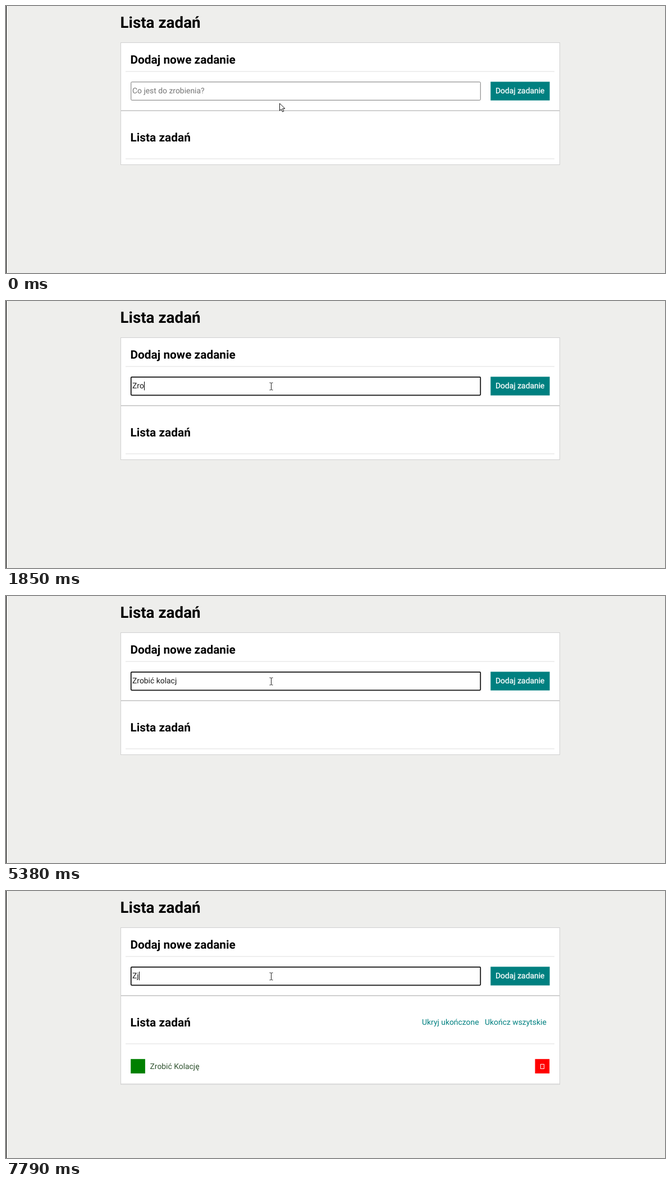
Recreate the animation shown at these times as an HTML page. Size 1174x477 px, loop 8000 ms.

```html
<!DOCTYPE html>
<html lang="pl">
<head>
<meta charset="utf-8">
<title>Lista zadań</title>
<style>
  html, body { margin: 0; width: 100%; height: 100%; overflow: hidden; background: #eeeeec; }
  svg { display: block; width: 1174px; height: 477px; }
  text { font: 13.9px Roboto, Arial, sans-serif; text-rendering: geometricPrecision; white-space: pre; }
  .h1 { font-size: 27.8px; font-weight: 700; }
  .h2 { font-size: 20.85px; font-weight: 700; }
  .hint { fill: #757575; }
  .link, .add { fill: #008080; }
  .label { fill: #fff; stroke: #fff; stroke-width: .3; }
  .card { fill: #fff; stroke: #d0d0d0; }
  .rule { fill: #eee; }
  #typed { fill: #1a1a1a; }
  #field { fill: #fff; stroke: #767676; }
  #field.focus { stroke: #101010; stroke-width: 1.75; }
</style>
</head>
<body>
<svg viewBox="0 0 1174 477">
  <rect width="1174" height="477" fill="#eeeeec"/>
  <rect width="1" height="477"/>
  <text class="h1" x="203.5" y="39">Lista zadań</text>

  <rect class="card" x="204.5" y="65.5" width="782" height="121"/>
  <text class="h2" x="221.5" y="102.5">Dodaj nowe zadanie</text>
  <rect class="rule" x="213" y="116" width="764" height="2"/>
  <rect id="field" x="222.75" y="135.75" width="622.5" height="32.5" rx="1.5"/>
  <text id="hint" class="hint" x="225" y="156">Co jest do zrobienia?</text>
  <text id="typed" x="225" y="156"></text>
  <rect id="caret" y="144" width="1" height="15.5"/>
  <rect class="add" x="863.3" y="135.3" width="105.3" height="33.4"/>
  <text class="label" x="872" y="156">Dodaj zadanie</text>

  <rect id="list" class="card" x="204.5" y="187.5" width="782" height="96"/>
  <text class="h2" x="221.5" y="242">Lista zadań</text>
  <rect class="rule" x="213" y="272" width="764" height="2"/>

  <g id="task">
    <text class="link" x="741" y="239">Ukryj ukończone</text>
    <text class="link" x="853" y="239">Ukończ wszytskie</text>
    <rect x="222.2" y="300.2" width="25.7" height="25.7" fill="#008000"/>
    <text x="256.5" y="318" fill="#2f522f">Zrobić Kolację</text>
    <rect x="942.5" y="300.2" width="25.7" height="25.7" fill="#f00"/>
    <rect x="952.5" y="309.5" width="6" height="8" fill="none" stroke="#fff"/>
    <rect class="rule" x="205" y="343" width="781" height="2"/>
  </g>

  <path id="arrow" d="M.5.5V13.5L3.5 10.7 5.6 15.5 7.8 14.5 5.7 9.8H10Z" fill="#fff" stroke="#111"/>
  <path id="beam" d="M-3 -6.5H-1L0 -5.5 1 -6.5H3M0 -5.5V5.5M-3 6.5H-1L0 5.5 1 6.5H3" fill="none" stroke="#222"/>
</svg>
<script>
const LOOP = 8000, FOCUS = 340, ADDED = 6250, BLINK = 490, TICK = 61;
const FIRST = 'Zrobić kolację', SECOND = 'Zj';

// one key press per character of FIRST + SECOND, in ms
const keys = [980, 1720, 1850, 2230, 2510, 3370, 3520, 3750, 4000, 4180, 4380, 4660, 4870, 5950, 7360, 7790];

const el = id => document.getElementById(id);
const show = (id, on) => el(id).setAttribute('visibility', on ? 'visible' : 'hidden');

function drawField(t) {
  const pressed = keys.filter(k => k <= t);
  const count = pressed.length;
  const text = t < ADDED ? FIRST.slice(0, count) : SECOND.slice(0, count - FIRST.length);
  const typed = el('typed');
  if (typed.textContent !== text) typed.textContent = text;
  show('hint', !text);
  el('field').classList.toggle('focus', t >= FOCUS);

  // the blink restarts with every key
  const idle = t - Math.max(FOCUS, ...pressed);
  const width = text ? typed.getComputedTextLength() : 0;
  el('caret').setAttribute('x', Math.round(225 + width));
  show('caret', idle >= 0 && Math.floor(idle / BLINK) % 2 === 0);
}

function drawList(t) {
  const added = t >= ADDED;
  show('task', added);
  el('list').setAttribute('height', added ? 158 : 96);
}

// eases out to the field in four sampled steps
function drawPointer(t) {
  const step = Math.floor((t + 21) / TICK);
  const p = 1 - (1 - Math.min(step / 4, 1)) ** 2;
  const x = 487 - 14.5 * p, y = 173.5 - 21 * p, inside = y < 169;
  show('arrow', !inside);
  show('beam', inside);
  el(inside ? 'beam' : 'arrow').setAttribute('transform', `translate(${x} ${y})`);
}

const start = performance.now();
function tick() {
  const t = (performance.now() - start) % LOOP;
  drawField(t);
  drawList(t);
  drawPointer(t);
  requestAnimationFrame(tick);
}
tick();
</script>
</body>
</html>
```
